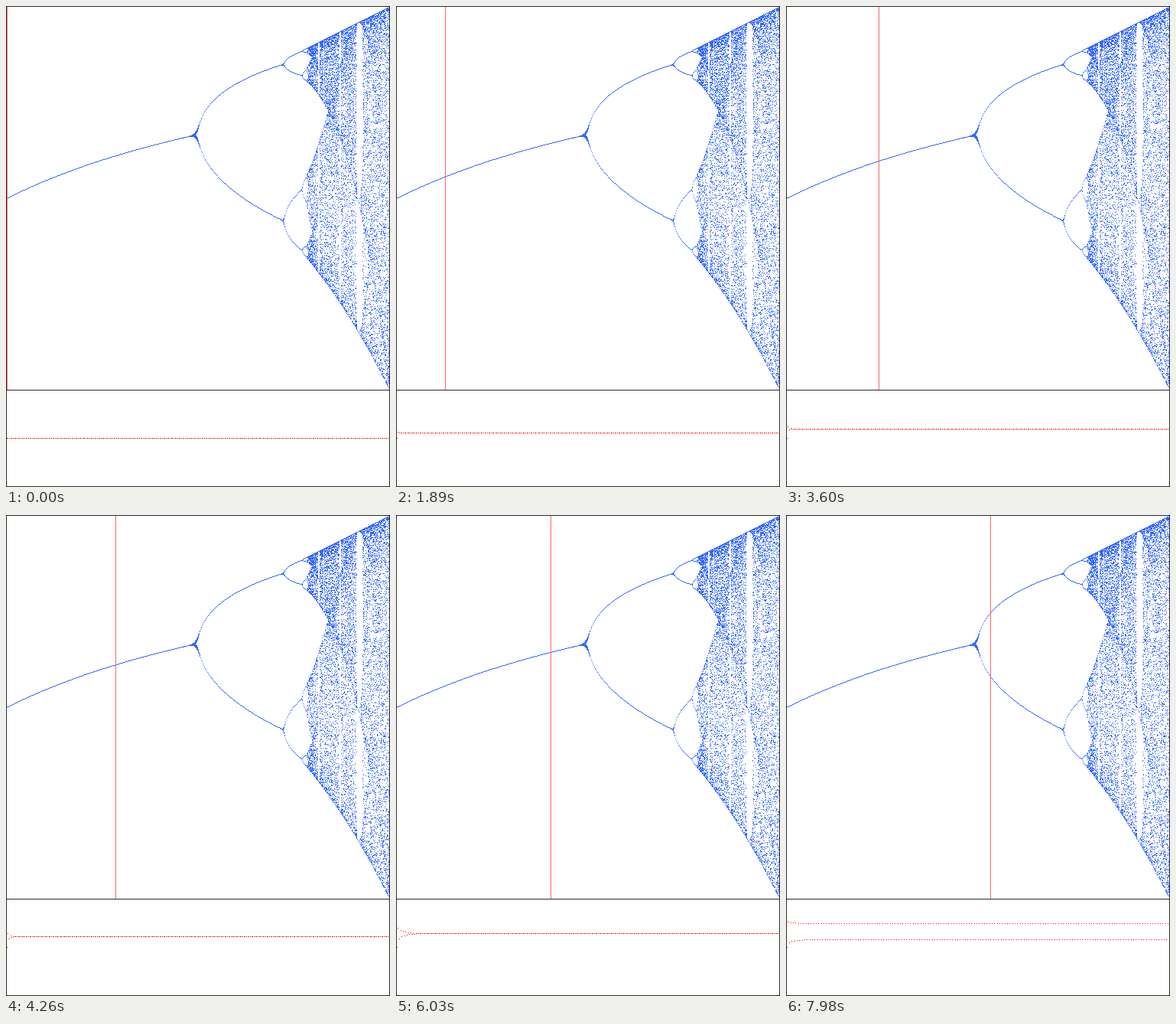
Recreate the animation shown at these times as a matplotlib script. Size 502x628 px, loop 8 s.

```python
import numpy as np
import matplotlib.pyplot as plt
from matplotlib.animation import FuncAnimation

W, H, DPI = 502, 628, 64
SIZE = 500            # side of the bifurcation plot
STRIP = 125           # height of the orbit strip
FRAMES, INTERVAL = 267, 30
SKIP, KEEP = 100, 125
ORBIT = 300           # iterations spread over the strip

WHITE = (255, 255, 255)
EDGE = (45, 45, 45)
BLUE = (51, 102, 255)
RED = (255, 0, 0)
CURSOR = (255, 100, 100)


def rate(col):
    return 2 + (col - 1) / 250


def logistic(r, x):
    return r * x * (1 - x)


def make_base():
    img = np.full((H, W, 3), WHITE, dtype=np.uint8)
    cols = np.arange(1, SIZE + 1)
    r = rate(cols)
    x = np.full(SIZE, 0.5)
    for n in range(SKIP + KEEP):
        x = logistic(r, x)
        if n >= SKIP:
            rows = SIZE - np.floor(SIZE * x).astype(int)
            img[rows, cols] = BLUE
    img[[0, SIZE + 1, H - 1], :] = EDGE
    img[:, [0, W - 1]] = EDGE
    return img


def draw_orbit(img, r):
    x = 0.5
    for n in range(ORBIT):
        row = H - 2 - int(STRIP * x)
        img[row, 1 + n * SIZE // ORBIT] = RED
        x = logistic(r, x)


base = make_base()
fig = plt.figure(figsize=(W / DPI, H / DPI), dpi=DPI, facecolor="white")
picture = fig.figimage(base, origin="upper")


def update(i):
    img = base.copy()
    col = i + 1
    img[1:SIZE + 1, col] = CURSOR
    draw_orbit(img, rate(col))
    picture.set_data(img)
    return (picture,)


anim = FuncAnimation(fig, update, frames=FRAMES, interval=INTERVAL,
                     init_func=lambda: update(0), repeat=True,
                     repeat_delay=0, blit=False)
plt.show()
```
